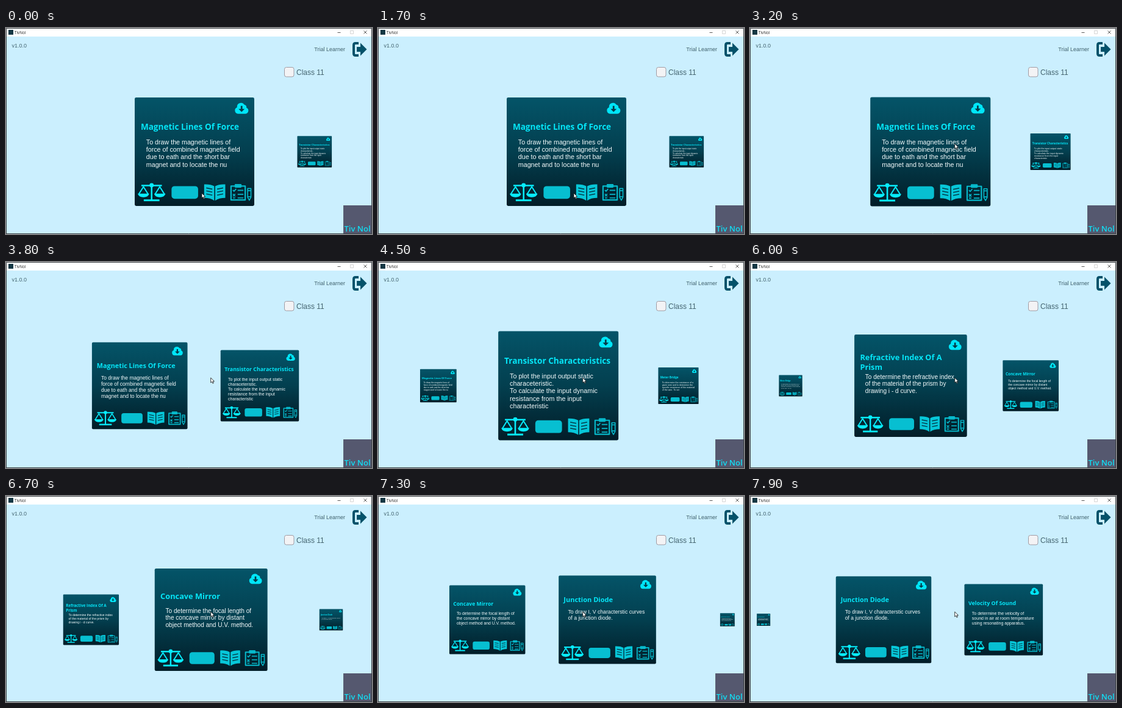
An HTML page with a canvas that plays this animation: 600x338 px, repeating every 8000 ms.

```html
<!DOCTYPE html>
<html lang="en">
<head>
<meta charset="utf-8">
<title>Experiment carousel</title>
<style>
  html, body { margin: 0; width: 100%; height: 100%; overflow: hidden; }
  canvas { display: block; width: 600px; height: 338px; }
</style>
</head>
<body>
<canvas id="stage" width="600" height="338"></canvas>
<script>
const ctx = document.getElementById('stage').getContext('2d');
const SANS = '"Liberation Sans", Arial, sans-serif';
const HEAD = '"Open Sans", sans-serif';
const LOOP = 8000, TICK = 100, SPACING = 196.8, MIDDLE = 300;
const DARK = '#033c4b';

const cards = [
  ['Magnetic Lines Of Force', 'To draw the magnetic lines of|force of combined magnetic field|due to eath and the short bar|magnet and to locate the nu'],
  ['Transistor Characteristics', 'To plot the input output static|characeteristic.|To calculate the input dynamic|resistance from the input|characteristic'],
  ['Meter Bridge', 'To determine the resistance of a|given wire and to determine the|specific resistance of the material|of the wire. To ver'],
  ['Refractive Index Of A|Prism', 'To determine the refractive index|of the material of the prism by|drawing i - d curve.'],
  ['Concave Mirror', 'To determine the focal length of|the concave mirror by distant|object method and U.V. method.'],
  ['Junction Diode', 'To draw I, V characterstic curves|of a junction diode.'],
  ['Velocity Of Sound', 'To determine the velocity of|sound in air at room temperature|using resonating apparatus.'],
].map(([title, body]) => ({ title: title.split('|'), body: body.split('|') }));

// x of the first card over time, and card width over distance from the middle
const scroll = [[2600, 309], [3100, 301], [3500, 280], [3800, 219.2], [4400, 131], [5100, -94],
  [6000, -327], [6700, -451], [7900, -765]];
const widths = [[0, 198], [9, 196], [36, 185], [81, 156.5], [116, 128.5], [161, 91],
  [197, 62.5], [233, 38.5], [278, 22], [300, 17]];

function lerpTable(table, x) {
  if (x <= table[0][0]) return table[0][1];
  for (let i = 1; i < table.length; i++) {
    const [x0, y0] = table[i - 1], [x1, y1] = table[i];
    if (x <= x1) return y0 + (y1 - y0) * (x - x0) / (x1 - x0);
  }
  return table[table.length - 1][1];
}

function rect(x, y, w, h, color, radius = 0) {
  ctx.fillStyle = color;
  ctx.beginPath();
  ctx.roundRect(x, y, w, h, radius);
  ctx.fill();
}

function text(str, x, y, font, color, align = 'left') {
  ctx.font = font;
  ctx.fillStyle = color;
  ctx.textAlign = align;
  ctx.fillText(str, x, y);
}

function at(x, y, draw) {
  ctx.save();
  ctx.translate(x, y);
  draw();
  ctx.restore();
}

function fill(path, color) {
  ctx.fillStyle = color;
  ctx.fill(new Path2D(path));
}

function stroke(path, color, width) {
  ctx.strokeStyle = color;
  ctx.lineWidth = width;
  ctx.lineJoin = 'round';
  ctx.stroke(new Path2D(path));
}

function cloud() {
  fill('M-6 9A5.5 5.5 0 0 1-7.5-1.6A6.6 6.6 0 0 1 4.5-6A4.5 4.5 0 0 1 8-1A5.2 5.2 0 0 1 6.5 9Z', '#00e6f8');
  fill('M-1.4-4H1.4V1H5L0 6L-5 1H-1.4Z', DARK);
}

function scales() {
  const color = '#08ecfc';
  stroke('M-17-11H17M0-11V13', color, 2.6);
  stroke('M-13 13.5H13', color, 3);
  fill('M-3.5-11.5a3.5 3.5 0 1 0 7 0a3.5 3.5 0 1 0-7 0', color);
  for (const x of [-13.5, 13.5]) at(x, 0, () => {
    stroke('M-7.5 3L0-9L7.5 3', color, 2);
    fill('M-9.5 2.5H9.5Q8 8.5 0 8.5T-9.5 2.5Z', color);
  });
}

function book() {
  for (const side of [-1, 1]) {
    ctx.save();
    ctx.scale(side, 1);
    fill('M.8-10.5Q7-14 17.5-13.5V9Q7 9 .8 13.5Z', '#07c7d9');
    stroke('M4-5.5L14-7.5M4-.5L14-2.5M4 4.5L14 2.5', DARK, 1.6);
    ctx.restore();
  }
}

function checklist() {
  const color = '#07b9cb';
  stroke('M-16.5-10.5H7V12.5H-16.5Z', color, 2.2);
  rect(-10.5, -14, 11.5, 6, color, 1.5);
  stroke('M-13.5-4l2 2l3.5-4M-13.5 2.5l4 4m0-4l-4 4M-13.5 9h4M-5.5-3.5H4M-5.5 3H4M-5.5 9H4', color, 1.7);
  stroke('M11-6.5H16.5V8L13.8 13L11 8ZM11-3H16.5M11 7H16.5', color, 1.6);
}

function drawCard({ title, body }, x, scale) {
  ctx.save();
  ctx.translate(x, 203);
  ctx.scale(scale, scale);
  const shade = ctx.createLinearGradient(0, -90, 0, 90);
  shade.addColorStop(0, '#045468');
  shade.addColorStop(0.5, '#033f4f');
  shade.addColorStop(1, '#021d28');
  rect(-99, -90, 198, 180, shade, 2.5);
  title.forEach((line, i) =>
    text(line, -89, -36.5 + 17 * (i - (title.length - 1) / 2), `bold 13.7px ${HEAD}`, '#05e5f7'));
  body.forEach((line, i) => text(line, -80, -12.3 + 12.4 * i, `10.8px ${SANS}`, '#f4fafb'));
  at(78, -72, cloud);
  at(-71, 67, scales);
  rect(-38, 57, 44, 21, '#07bfd1', 5);
  at(33.5, 67.5, book);
  at(77, 67.5, checklist);
  ctx.restore();
}

function drawWindow() {
  rect(0, 0, 600, 338, '#cbeffe');
  rect(0, 0, 600, 14, '#fff');
  rect(4, 3, 8, 8, '#143744');
  text('TivNol', 14, 9.6, `6.3px ${HEAD}`, '#222');
  stroke('M543.5 7.5H548.5M586.5 4.5L591.5 9.5M591.5 4.5L586.5 9.5', '#333', 0.8);
  stroke('M564.5 4.5H569.5V9.5H564.5Z', '#ccc', 0.8);

  text('v1.0.0', 9.5, 31.7, `9px ${SANS}`, '#45656f');
  text('Trial Learner', 556, 38.3, `9px ${SANS}`, '#3f606b', 'right');
  text('Class 11', 476, 76.8, `12px ${SANS}`, '#456570');
  rect(456.5, 64.5, 15.5, 15.5, '#f3f3f5', 3);
  ctx.strokeStyle = '#a09ca4';
  ctx.lineWidth = 1;
  ctx.stroke();

  stroke('M578 25H573Q570 25 570 28V42Q570 45 573 45H578', '#04526a', 4);
  fill('M575 31H581V24.5L591.5 35L581 45.5V39H575Z', '#04526a');

  rect(553, 291, 47, 47, '#55586f');
  text('Tiv Nol', 576, 333.5, `600 13px ${HEAD}`, '#12dcf2', 'center');
}

function drawCursor(x, y) {
  at(x, y, () => {
    const arrow = 'M0 0V8L1.9 6.3L3.2 9.2L4.6 8.6L3.3 5.8H5.8Z';
    fill(arrow, '#fff');
    stroke(arrow, '#111', 0.8);
  });
}

function render(t) {
  drawWindow();
  const first = lerpTable(scroll, t);
  cards.forEach((card, i) => {
    const x = first + i * SPACING, distance = Math.abs(x - MIDDLE);
    if (distance < 290) drawCard(card, x, lerpTable(widths, distance) / 198);
  });
  const move = Math.min(1, Math.max(0, (t - 2000) / 500));
  drawCursor(321 + 14.7 * move, 271 - 81 * move);
  stroke('M.5 338V.5H599.5V337.5H0', '#3c4246', 1);
}

function loop(now) {
  render(Math.floor(now % LOOP / TICK) * TICK);
  requestAnimationFrame(loop);
}
requestAnimationFrame(loop);
</script>
</body>
</html>
```
